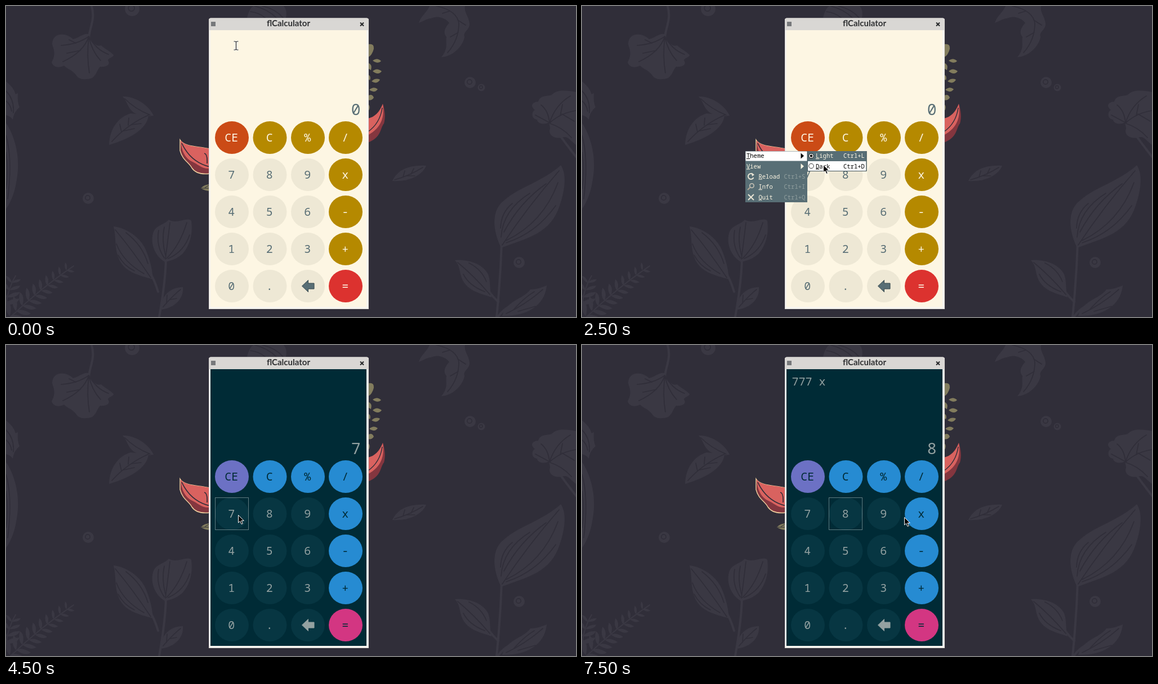
These frames come from a looping animation (1012x553 px, 8 s). An HTML page:

```html
<!DOCTYPE html>
<html lang="en">
<head>
<meta charset="utf-8">
<title>flCalculator</title>
<style>
html, body { margin: 0; width: 100%; height: 100%; overflow: hidden; background: #302e39; }
svg { display: block; }
text { font-family: "Noto Sans Mono", "DejaVu Sans Mono", monospace; white-space: pre; }
.leaf { fill: #3a3843; }
.stem { fill: none; stroke: #3a3843; stroke-width: 4; stroke-linecap: round; }
.vein { fill: none; stroke: #302e39; stroke-width: 1.7; stroke-linecap: round; }
#calc { --bg: #fdf6e3; --num: #eee8d5; --text: #586e75; --op: #b58900; --ce: #cb4b16; --eq: #dc322f; --edge: #34464c; }
#calc.dark { --bg: #002b36; --num: #073642; --text: #93a1a1; --op: #268bd2; --ce: #6c71c4; --eq: #d33682; --edge: #93a1a1; }
#face { fill: var(--bg); }
#keys text { font-size: 20px; text-anchor: middle; }
.num { fill: var(--num); }
.op { fill: var(--op); }
.ce { fill: var(--ce); }
.eq { fill: var(--eq); }
.ink { fill: var(--text); }
.inv { fill: var(--bg); }
#focus { fill: none; stroke-width: 1; stroke-dasharray: 1 1; }
#menu text { font-size: 10.5px; fill: #fdf6e3; }
#menu .on { fill: #000; }
#menu .dim { fill: #92a09f; }
#menu tspan { text-decoration: underline; }
</style>
</head>
<body>
<svg width="1012" height="553" viewBox="0 0 1012 553">
<rect width="1012" height="553" fill="#302e39"/>
<g id="plants">
  <path class="stem" d="M152 0C159 25 148 38 147 58"/>
  <path class="leaf" d="M147 50C137 48 127 58 119 59C106 46 82 47 82 68C85 78 89 86 81 100C84 109 93 111 103 106C110 113 119 114 126 125C132 132 144 131 153 128C161 122 161 115 167 108C176 109 187 105 181 97C181 92 192 91 191 87C183 79 175 76 169 70C160 73 153 66 147 50Z"/>
  <path class="vein" d="M147 54Q128 68 98 70M147 54Q138 82 101 99M147 54Q143 90 148 119M147 54Q152 80 168 97M147 54Q160 78 182 86M124 66L112 60M132 79L108 84"/>

  <path class="leaf" d="M428 21C431 8 435 3 439 0H493C499 7 498 15 497 21Z"/>
  <path class="vein" d="M441 0Q465 6 480 21M455 0Q478 5 492 21M434 10Q450 12 460 21"/>

  <path class="leaf" d="M752 0H815C812 10 824 22 823 34C821 44 811 46 814 55C812 70 794 90 773 91C786 75 780 66 782 55C775 47 780 38 787 30C779 20 764 17 754 22C746 23 741 27 733 30C737 17 747 12 752 0Z"/>
  <path class="vein" d="M764 0Q801 8 804 31Q804 60 784 83M802 25L816 34M803 47L789 55M788 9L775 13"/>

  <path class="leaf" d="M0 134Q14 145 17 157L21 155Q20 172 24 180Q14 188 12 202Q8 196 0 194Z"/>
  <path class="vein" d="M0 151Q15 166 13 190M0 169Q8 175 10 187"/>
  <path class="leaf" d="M0 208C16 232 23 264 21 293C18 324 12 343 0 361Z"/>
  <path class="vein" d="M0 230Q12 272 3 343M0 260Q5 295 0 325"/>

  <path class="leaf" d="M207 161C228 160 253 175 262 195C247 198 229 194 222 185C216 179 214 168 207 161ZM183 247C184 220 197 199 221 191L253 194C251 220 217 237 183 247Z"/>
  <path class="vein" d="M211 165Q229 183 256 194M188 241Q215 211 253 194M205 224L202 210M217 212L218 199M209 222L228 218M223 211L240 209"/>

  <path class="stem" d="M1012 268Q984 232 968 208"/>
  <path class="leaf" d="M964 207C951 213 943 207 943 202C932 201 933 187 939 185C930 177 934 171 945 170C948 158 961 161 969 158C980 147 997 151 1012 153V247C1001 239 998 230 987 234C972 237 962 228 966 218Z"/>
  <path class="vein" d="M965 208Q985 190 1012 186M965 208Q975 176 1002 160M965 208Q963 186 950 176M966 209Q988 216 1004 234M966 208L940 194M984 195L988 175M987 192L1009 205"/>

  <path class="leaf" d="M686 311C694 294 711 282 746 284C739 301 716 313 686 311Z"/>
  <path class="vein" d="M690 309Q716 302 740 287M705 304L708 293M719 299L724 289M712 302L726 302"/>

  <path class="stem" d="M880 420Q878 484 871 553"/>
  <path class="leaf" d="M879 430C863 396 862 363 884 346C912 321 952 313 985 283C997 301 991 332 983 355C967 404 928 412 879 430Z"/>
  <path class="vein" d="M881 425Q926 357 982 293M879 411Q882 363 930 333M878 395Q879 367 899 351M888 417Q954 385 980 314M888 421Q941 404 976 355M884 402Q912 349 959 316"/>

  <path class="stem" d="M284 443Q284 486 272 553M270 508Q258 466 232 450M276 531L295 520"/>
  <path class="leaf" d="M191 392C212 394 237 410 247 431C256 451 260 470 261 486C237 479 212 474 201 451C192 432 196 411 191 392Z"/>
  <path class="vein" d="M194 398Q225 435 257 483M196 423Q208 455 245 476M213 403Q242 425 252 458M199 443Q209 462 228 471"/>
  <path class="leaf" d="M282 455C265 445 256 424 261 404C266 389 280 390 289 380C303 389 323 374 329 382C332 404 327 426 313 441C304 449 294 453 282 455Z"/>
  <path class="vein" d="M283 450Q287 420 291 385M281 448Q266 426 271 399M285 449Q309 425 321 385M288 449Q316 437 326 407M283 443Q276 416 281 393"/>
  <path class="leaf" d="M274 540C275 516 291 500 314 500C316 519 301 537 274 540Z"/>
  <path class="vein" d="M279 535Q294 517 310 504M285 529L286 514M292 522L303 520"/>

  <path class="stem" d="M874 526Q863 516 855 504M873 553Q885 536 908 528"/>
  <path class="leaf" d="M797 452C822 450 847 459 856 477C861 490 858 503 862 518C843 511 822 508 811 488C804 474 807 462 797 452Z"/>
  <path class="vein" d="M802 456Q833 482 859 513M812 477Q822 497 850 508M822 457Q844 468 853 490"/>
  <path class="leaf" d="M881 551C888 524 919 521 931 504C943 504 952 500 960 497C957 529 930 552 881 551Z"/>
  <path class="vein" d="M888 547Q924 530 953 504M902 539Q922 517 938 508M909 543L940 534"/>
  <g id="fern"></g>
  <g id="berries"></g>

  <path d="M309 238C317 251 340 249 362 254V298C346 300 336 297 330 288C325 278 313 274 309 257Z" fill="#84363f" stroke="#f0cf9e" stroke-width="1.4"/>
  <path d="M310 239C319 251 340 249 362 254V289C347 290 341 281 329 276C319 271 311 258 310 239Z" fill="#d9625f"/>
  <path d="M312 244Q328 278 362 286M352 262Q358 263 357 280" fill="none" stroke="#302e39" stroke-width="1.7"/>
  <path d="M346 324Q352 317 363 317V329Q353 329 346 324Z" fill="#827c5d"/>
  <path d="M347 324H361M353 323L360 319" stroke="#302e39"/>
  <path d="M669 174C673 185 674 199 671 209C664 217 667 234 642 243V202C657 198 663 188 669 174Z" fill="#84363f"/>
  <path d="M669 174C672 196 668 216 642 230V200C655 198 664 187 669 174Z" fill="#d9625f"/>
  <path d="M668 181Q664 209 642 224" fill="none" stroke="#302e39" stroke-width="1.5"/>
  <g fill="#827c5d">
    <path d="M643 68Q654 66 653 76Q650 88 643 91ZM642 173Q649 180 643 187Z"/>
    <path d="M651 97Q659 91 666 98Q660 104 651 97ZM651 116Q658 109 667 116Q661 124 651 116ZM649 134Q656 127 664 131Q659 140 649 134ZM645 149Q653 142 660 148Q654 156 645 149ZM642 160Q650 155 653 163Q649 169 642 167ZM643 101Q651 104 648 114L643 111ZM643 122Q649 125 646 132L643 130Z"/>
  </g>
</g>

<g id="calc">
  <path d="M360 539V25Q360 21.500 364 21.500H640Q644 21.500 644 25V539Z" fill="#f7f5f0"/>
  <path d="M360 43V25Q360 21.500 364 21.500H640Q644 21.500 644 25V43Z" fill="#d9d7d4"/>
  <path d="M360.500 43V538.500H643.500V43" fill="none" stroke="#c9c6c1" stroke-width=".6"/>
  <rect x="364" y="28" width="8" height="8" fill="#77797b"/>
  <text x="501.500" y="36" font-size="15" font-weight="700" text-anchor="middle" fill="#2f3032" style="font-family:Lato,sans-serif">flCalculator</text>
  <path d="M629 29.500L635 35.500M635 29.500L629 35.500" stroke="#252628" stroke-width="2"/>
  <rect id="face" x="363" y="43" width="277" height="492"/>
  <text id="expr" class="ink" x="372.500" y="72" font-size="20"></text>
  <text id="value" class="ink" x="629.500" y="193.500" font-size="28" text-anchor="end"></text>
  <g id="keys"></g>
  <rect id="focus" width="59" height="57"/>
</g>

<g id="menu">
  <rect x="290" y="258" width="110" height="91" fill="#586e75"/>
  <rect x="290.500" y="258.500" width="109" height="17" fill="#fff"/>
  <path d="M388.500 261.500L394 266.500L388.500 271.500Z"/>
  <path d="M388.500 280L394 285L388.500 290Z" fill="#fdf6e3"/>
  <g fill="none" stroke="#e9e4d5" stroke-width="2">
    <path d="M304 300A5 5 0 1 0 304.500 305"/>
    <path d="M301 296.500L306 300L302 303Z" fill="#e9e4d5" stroke="none"/>
    <circle cx="301.500" cy="319.500" r="3.700" stroke="#c8c3b6" stroke-width="1.600"/>
    <path d="M298.500 322.500L294 327" stroke="#b5a896"/>
    <path d="M295 335L305 345M305 335L295 345"/>
  </g>
  <rect x="400" y="258" width="105.500" height="36" fill="#586e75"/>
  <rect x="400.500" y="276" width="104" height="17" fill="#fff"/>
  <path d="M400.500 258V293.500H505V258" fill="none" stroke="#43545a"/>
  <circle cx="407" cy="266.500" r="4.300" fill="#fff" stroke="#111"/>
  <circle cx="407" cy="266.500" r="2.300"/>
  <circle cx="407" cy="284.500" r="4.300" fill="#fff" stroke="#333"/>
</g>

<path id="arrow" d="M.5 .5V14L3.600 11.200L6 16.500L8.300 15.500L6 10.400H10.300Z" fill="#000" stroke="#fff" stroke-width="1"/>
<g id="beam" fill="none">
  <path d="M-4 -7.500H-1.500L0 -6.500L1.500 -7.500H4M0 -6.500V6.500M-4 7.500H-1.500L0 6.500L1.500 7.500H4" stroke="#fff" stroke-width="2.600"/>
  <path d="M-4 -7.500H-1.500L0 -6.500L1.500 -7.500H4M0 -6.500V6.500M-4 7.500H-1.500L0 6.500L1.500 7.500H4" stroke="#222" stroke-width="1.200"/>
</g>
</svg>
<script>
const $ = id => document.getElementById(id);

function add(parent, tag, attrs, text = "") {
  const el = document.createElementNS("http://www.w3.org/2000/svg", tag);
  for (const k in attrs) el.setAttribute(k, attrs[k]);
  el.textContent = text;
  parent.append(el);
  return el;
}

// Background berries and fern
for (const [x, y, r] of [[224, 5, 13], [146, 342, 10], [824, 136, 10], [844, 145, 6.5], [911, 456, 10]]) {
  add($("berries"), "circle", { cx: x, cy: y, r, class: "leaf" });
  add($("berries"), "circle", { cx: x - r * .1, cy: y - r * .1, r: r * .42, class: "vein" });
}
function frond(x, y, angle, length, count) {
  const g = add($("fern"), "g", { transform: `translate(${x} ${y}) rotate(${angle})` });
  add(g, "path", { class: "stem", d: `M0 0Q${length / 2} -6 ${length} 0`, style: "stroke-width:2" });
  for (let i = 0; i < count; i++) {
    const s = 1 - .55 * i / count;
    for (const side of [-1, 1]) add(g, "path", {
      class: "leaf", d: "M0 0Q9 -9 28 -3Q20 7 0 0Z",
      transform: `translate(${length * i / count} -2) rotate(${side * 55}) scale(${s})`
    });
  }
}
frond(8, 553, -39, 144, 10);
frond(0, 532, -72, 55, 4);

// Keypad
const COLS = [401, 468.5, 536, 603], ROWS = [234, 300, 366, 432, 498];
["CE", "C", "%", "/", "7", "8", "9", "x", "4", "5", "6", "-", "1", "2", "3", "+", "0", ".", "", "="].forEach((label, i) => {
  const x = COLS[i % 4], y = ROWS[i >> 2];
  const kind = { CE: "ce", "=": "eq" }[label] || (i < 4 || i % 4 === 3 ? "op" : "num");
  add($("keys"), "ellipse", { cx: x, cy: y, rx: 30, ry: 29, class: kind });
  if (label) add($("keys"), "text", { x: x - .7, y: y + 7, class: kind === "num" ? "ink" : "inv" }, label);
  else add($("keys"), "path", {
    class: "ink", d: "M525.5 498L536.5 487.500V493H547V503H536.500V508.500Z", style: "stroke:var(--edge)"
  });
});

// Menu entries: name, name x, shortcut, shortcut x, baseline, name style, shortcut style
const items = [
  ["Theme", 292, "", 0, 270, "on", ""],
  ["View", 292, "", 0, 288.5, "", ""],
  ["Reload", 313.5, "Ctrl+S", 358.5, 306.5, "", "dim"],
  ["Info", 313.5, "Ctrl+I", 358.5, 325, "", "dim"],
  ["Quit", 313.5, "Ctrl+Q", 358.5, 343.5, "", "dim"],
  ["Light", 415, "Ctrl+L", 464, 270, "", ""],
  ["Dark", 415, "Ctrl+D", 464, 288.5, "on", "on"]
];
for (const [name, x, keys, kx, y, style, keyStyle] of items) {
  const t = add($("menu"), "text", { x, y, class: style });
  add(t, "tspan", {}, name[0]);
  t.append(name.slice(1));
  if (keys) add($("menu"), "text", { x: kx, y, class: keyStyle }, keys);
}

const LOOP = 8000;
const steps = [
  { at: 0, beam: [408.5, 70.5], value: "0" },
  { at: 500, beam: [393.5, 135.5], value: "0" },
  { at: 1500, arrow: [430, 267], value: "0" },
  { at: 2500, arrow: [428, 282], value: "0", menu: true },
  { at: 3500, arrow: [428, 282], value: "0", dark: true },
  { at: 4500, arrow: [412, 302], value: "7", dark: true, focus: [0, 1] },
  { at: 5500, arrow: [662, 328], value: "777", dark: true, focus: [0, 1] },
  { at: 6500, arrow: [604, 318], value: "0", expr: "777 x", dark: true, focus: [3, 1] },
  { at: 7500, arrow: [572, 306], value: "8", expr: "777 x", dark: true, focus: [1, 1] }
];

function place(id, pos) {
  $(id).style.display = pos ? "" : "none";
  if (pos) $(id).setAttribute("transform", `translate(${pos})`);
}

function show(s) {
  $("calc").classList.toggle("dark", !!s.dark);
  $("menu").style.display = s.menu ? "" : "none";
  $("value").textContent = s.value;
  $("expr").textContent = s.expr || "";
  place("arrow", s.arrow);
  place("beam", s.beam);
  const f = s.focus;
  place("focus", f && [Math.floor(COLS[f[0]]) - 29.5, ROWS[f[1]] - 28.5]);
  $("focus").style.stroke = f && f[0] === 3 ? "var(--bg)" : "#c3cccc";
}

let current;
const start = performance.now();
function tick(now) {
  const t = Math.max(0, now - start) % LOOP;
  const next = steps.findLast(s => s.at <= t);
  if (next !== current) show(current = next);
  requestAnimationFrame(tick);
}
tick(start);
</script>
</body>
</html>
```
